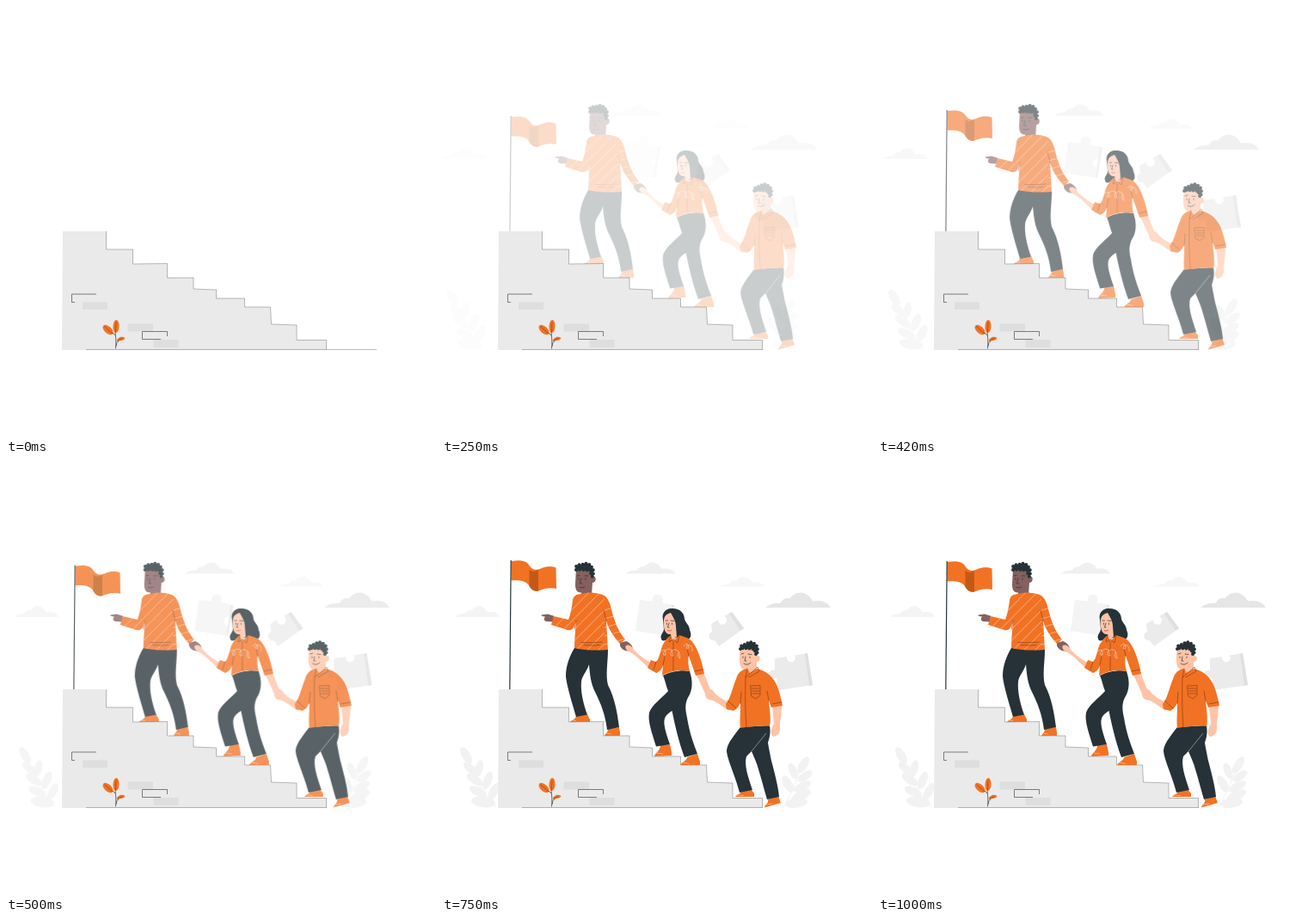
These frames come from a looping animation (500x500 px, 1.04 s). An HTML page:

```html
<!DOCTYPE html>
<html lang="en">
<head>
<meta charset="utf-8">
<title>Climbing together</title>
<style>
html, body { margin: 0; width: 100%; height: 100%; overflow: hidden; background: #fff }
svg { display: block; width: 100vw; height: 100vh }
.o { fill: #f27224 }
.d { fill: #263238 }
.b { fill: #85605f }
.s { fill: #ffc3a6 }
.curl { stroke: #263238; stroke-width: 4; stroke-linecap: round; stroke-dasharray: 0 4 }
.ink { fill: none; stroke: #263238; stroke-width: .7; stroke-linecap: round }
.seam { fill: none; stroke: #7c3611; stroke-width: .6; stroke-linecap: round }
.pale { fill: none; stroke: #fff; stroke-width: .6; opacity: .7 }
.line { fill: none; stroke: #777; stroke-width: .5 }
</style>
</head>
<body>
<svg viewBox="0 0 500 500">
  <defs>
    <path id="cloud" d="M0 17C4 13 10 12 17 12C20 7 24 6 28 7C32 1 42-2 48 3C52 5 53 8 55 10C64 8 73 11 75 17Z"/>
    <path id="sweater" d="M162 151C157 152 154 153 153 158C152 168 150 176 148 181L131 177L128 187L147 193C152 194 154 191 155 188L157 182C156 194 155 205 155 214C168 217 182 217 194 216L192 182C194 190 199 199 208 209L214 204C205 193 202 183 199 173C196 159 193 152 184 151C176 149 169 149 162 151Z"/>
    <clipPath id="knit"><use href="#sweater"/></clipPath>
  </defs>

  <g id="scenery">
    <use href="#cloud" fill="#f4f4f4" transform="translate(14 165)scale(.69 .75)"/>
    <use href="#cloud" fill="#f0f0f0" transform="translate(213 114)scale(.76 .8)"/>
    <use href="#cloud" fill="#f7f7f7" transform="translate(322 131)scale(.69 .68)"/>
    <use href="#cloud" fill="#e6e6e6" transform="translate(375.500 149)scale(1 1.060)"/>
    <path fill="#f4f4f4" d="M229 158L244 159.500A6 6 0 1 1 254.500 161L269 164L266.500 178A5.500 5.500 0 1 0 265 188L263 200L224 194Z"/>
    <path fill="#e8e8e8" d="M254 161A6 6 0 0 0 250 152A6 6 0 0 1 254 161ZM266 164L269 164L263 200L261 199Z"/>
    <path fill="#ebebeb" d="M312 186L320 181A5 5 0 1 0 327 177L336 172L350 191L321 212L316 205A5 5 0 1 1 313 195Z"/>
    <path fill="#e0e0e0" d="M333 174L336 172L350 191L346 194Z"/>
    <path fill="#ebebeb" d="M386 226L400 224A5 5 0 1 0 409 222.500L424 220L430 257L390 263L388 248A5 5 0 1 1 386 240Z"/>
    <path fill="#dfdfdf" d="M421 220.500L424 220L430 257L426 258Z"/>
    <g id="plants" fill="#f2f2f2" stroke="#f2f2f2"></g>
  </g>

  <g id="flag">
    <path class="o" d="M80.500 114C90 112.500 98 113 101.500 119C106 126 112 124 116 122C122 119.500 128 120 132.500 121.500L133 146C127 144.500 121 145 115 147.500C108 150.500 104 148 101 142C96 136 88 136 80.500 136.500Z"/>
    <path fill="#c45915" d="M101.500 123.500C104 127 109 126 112 124L112 148.500C108 149.500 104 147 101.500 143Z"/>
    <path d="M80.200 113L78.800 264" stroke="#263238" stroke-width="1.200"/>
  </g>

  <path fill="#eaeaea" d="M66 262H116.500V283H147.500V300L187.500 299.500V316H218V329L244.500 330V340H277.500V350H307.500L308.500 370L338 371V388.500H372.500V400H65Z"/>
  <path class="line" d="M116.500 262V283H147.500V300L187.500 299.500V316H218V329L244.500 330V340H277.500V350H307.500L308.500 370L338 371V388.500H372.500V399.500"/>
  <path id="ground" class="line"/>
  <path fill="#dedede" d="M89 344.500h29v8.500h-29ZM141.500 369.500h29.500v9h-29.500ZM171.500 388h29v9h-29Z"/>
  <path fill="none" stroke="#4d4d4d" stroke-width=".7" d="M105 335H76.500V344.500H80M187.500 384V378.500H158.500V387.500H180"/>
  <g>
    <path class="ink" d="M127.500 398C128.500 391 127.500 385 127 379M127 383L124 380M128.500 395C128 392 129 391 131 390"/>
    <ellipse class="o" rx="7.200" ry="4" transform="translate(118.500 376.500)rotate(42)"/>
    <ellipse class="o" rx="3.500" ry="7.600" transform="translate(128 372.500)rotate(3)"/>
    <path class="o" d="M128.500 390.500C129 386 134 383 138.500 386C137 390 133 388 128.500 390.500Z"/>
    <path class="seam" d="M115 373L124 381M128 368L127.500 379M130 389L135 386.500"/>
  </g>

  <g id="people">
    <g>
      <path class="b" d="M132 177L124 174.500L116.500 175.500Q116 177 121 177.500Q118 181 122 183L130 183.500ZM208 208L215 206C220 208 224 212 222 216C217 219 210 217 208 211Z"/>
      <path class="b" d="M157 121L176 121V131C181 129 181 138 176 138L175 152C171 155 165 154 163 151V149.500C158 150 156 146 156 140Z"/>
      <path class="d curl" d="M157 123C155 118 160 117 164 117C169 114 174 117 175 120C178 123 177 128 176 131L175 130L173 123C167 124 161 122 157 123Z"/>
      <path class="ink" d="M158 130L161 129.500M167 130L171 130M160 133v1.500M168 133v1.500M163 133L161.500 139H164M161 143.500Q164 145 167 143"/>
      <path class="o" d="M150 300C152 297 156 298 157 293L170 291L173 297V300ZM190 316C192 312 194 312 194 308L207 306L208 312V316Z"/>
      <path class="d" d="M155 214C149 224 145 235 145 247C146 258 153 280 157 294L170 291.500C165 278 162 264 163 253C164 246 169 242 172 233C173 245 174 255 179 265C186 279 191 292 193 309L207 306C205 290 202 272 194 257C191 245 194 230 194 216Z"/>
      <use href="#sweater" class="o"/>
      <path id="stripes" class="pale" clip-path="url(#knit)"/>
      <path class="seam" d="M157 182L155 192M192 182L189 170M163 207.500Q175 208.500 187 207M166 210.500Q176 211.500 184 210.500"/>
      <path class="pale" d="M150 297.500L157 298.500M192 313L198 314"/>
    </g>
    <g>
      <path class="d" d="M258 181C256 173 262 168 267 168C277 167 283 173 283 180C284 185 289 187 289 193C292 199 290 204 285 205C281 207 277 205 275 202L266 201C262 206 256 207 256 203C254 199 259 196 259 192Z"/>
      <path class="s" d="M246 241C237 234 228 223 220 219C216 217 213 214 215 211C220 209 222 213 225 217C232 224 239 229 247 232ZM296 243L305 242L313 262C318 263 320 269 318 273C312 276 307 273 307 267Z"/>
      <path class="s" d="M259 181C260 175 264 174 267 173C270 179 273 182 273 189L274 201L267 204V198C260 199 258 190 259 181Z"/>
      <path class="ink" d="M261 182h2.500M267 182L271 182.500M262.500 185v1.500M268.500 185v1.500M265 185L263.500 190H265"/>
      <path fill="none" stroke="#d9472b" stroke-width=".8" d="M263 193.500Q266 195 268 193"/>
      <path class="o" d="M248 340C249 335 255 334 255 327L266 326L268 335V339ZM278 350C280 346 286 345 286 341L298 337L301 346V350Z"/>
      <path class="d" d="M258 246C267 241 281 239 289 241C292 250 293 259 289 268C284 276 283 282 286 295C289 314 294 326 298 337L283 341C276 322 272 304 268.500 287C258 294 256 297 266 326L250 328.500C245 312 240 299 242 289C245 280 257 272 264 264C261 256 260 250 258 246Z"/>
      <path class="o" d="M267 199C262 203 258 208 256 215C254 222 253 227 250 230L244 228L240 237L250 243C255 241 257 238 258 234L257 246C268 240 279 239 289 241C287 232 287 226 288 223L296 246L306 244C304 232 299 216 293 208C289 202 283 201 277 199L270 206Z"/>
      <path class="seam" d="M267 199L265 207L270 204L277 199L275 208L270 204V240M258 234L260 224M288 223L286 215M250 230L247 239M295 241L304 239"/>
      <path class="pale" d="M254 219Q262 212 261 222Q256 223 260 217Q269 211 270 223Q265 224 268 217Q277 212 278 226Q273 224 277 218M282 212Q287 205 288 214Q284 217 286 211Q293 209 292 218"/>
      <path class="pale" d="M250 336L258 337M281 347L288 348.500"/>
    </g>
    <g>
      <path class="s" d="M335 287C326 282 320 275 312 274C307 272 306 267 310 263C317 263 321 270 325 272L336 278ZM385 280L396 280C396 291 394 299 394 305C395 312 391 317 386 317C382 314 384 307 387 302Z"/>
      <path class="s" d="M348 214L367 214V223C372 221 372 230 367 230L367 240L357 246L355 239C346 240 346 228 348 214Z"/>
      <path class="d curl" d="M348 215C347 212 350 210 354 210C358 206 363 207 365 210C369 212 368 217 367 222L366 221L364 215C358 215 353 213 348 215Z"/>
      <path class="ink" d="M349 221L352 220M357 221L361 221.500M351 224v1.500M359 224v1.500M354 224L353 229H355M352 232Q356 235 360 231"/>
      <path class="o" d="M342 387C345 383 349 384 349 380L360 378L364 383V387ZM376 399.500C377 395 381 395 380 390L392 386L395 394Z"/>
      <path class="d" d="M348 306C342 314 333 324 332 333C332 342 343 365 347 382L362 379C357 364 352 350 355 340L361 334C364 342 367 347 369 355C373 368 376 380 379 390L393 387C392 375 388 360 384 345C382 335 381 330 380 324C383 316 383 310 382 304Z"/>
      <path class="o" d="M356 238C349 239 345 243 343 250C338 262 336 274 331 279L332 285L340 287C344 285 346 282 348 278C348 290 347 300 348 307C360 305 372 304 382 305C384 298 382 286 381 275L384 283L397 281C394 266 391 256 386 250C380 242 374 240 367 238L359 243Z"/>
      <path class="seam" d="M356 238L354 248L359 244L368 236L370 241L358 248M354 248Q353 280 355 306M348 278L349 265M381 275L379 264M333 275L343 284M385 279L396 277"/>
      <path class="seam" d="M360 258L371 257.500V269L366 273L361 270ZM361 261H370M362 264H370M362 267H370"/>
      <path class="pale" d="M344 385L352 385.500M378 396L385 395M361 334L378 313"/>
    </g>
  </g>
</svg>
<script>
const el = id => document.getElementById(id);

// x, y, half length, angle
const leaves = [
  [27, 339, 11, 60], [32, 354, 10, 40], [42, 354, 10, 105], [37, 367, 11, 35], [52, 368, 11, 112],
  [41, 381, 11, 25], [59, 381, 11, 118], [47, 393, 14, 8],
  [419, 350, 11, -58], [407, 357, 10, 68], [421, 363, 10, -35], [401, 372, 11, 60],
  [418, 375, 11, -28], [417, 385, 12, -24], [411, 394, 13, -8]
];
el('plants').innerHTML = leaves.map(([x, y, r, a]) =>
  `<ellipse rx="${r}" ry="${r * .45}" stroke="none" transform="translate(${x} ${y})rotate(${a})"/>`).join('') +
  '<path fill="none" d="M25 333C34 360 44 380 62 399M421 343C412 365 405 385 396 399"/>';

let stripes = '';
for (let y = 152; y < 260; y += 13) stripes += `M125 ${y + 32}L190 ${y - 34}`;
for (let y = 166; y < 210; y += 10) stripes += `M190 ${y + 4}L215 ${y - 3}`;
el('stripes').setAttribute('d', stripes);

// Cubic easing with a small overshoot; x is solved by bisection
function ease(x) {
  const bez = (a, b, s) => 3 * a * s * (1 - s) ** 2 + 3 * b * s * s * (1 - s) + s ** 3;
  let lo = 0, hi = 1;
  for (let k = 0; k < 24; k++) {
    const mid = (lo + hi) / 2;
    if (bez(.36, .5, mid) < x) lo = mid; else hi = mid;
  }
  return bez(-.01, 1.38, lo);
}

function place(id, x, y, opacity) {
  el(id).setAttribute('transform', `translate(${x} ${y})`);
  el(id).style.opacity = opacity;
}

function draw() {
  const step = Math.floor((performance.now() % 1040 + 4) * .024);
  const p = step < 2 ? 0 : ease(Math.min(1, step / 24 + .01));
  const shift = 20 * (1 - p), opacity = Math.max(0, Math.min(1, p));
  place('scenery', -shift, 0, opacity);
  place('flag', 0, shift, opacity);
  place('people', shift, 0, opacity);
  el('ground').setAttribute('d', `M93 399.500H${step < 2 ? 431 : step < 6 ? 317 : 373}`);
  requestAnimationFrame(draw);
}
draw();
</script>
</body>
</html>
```
